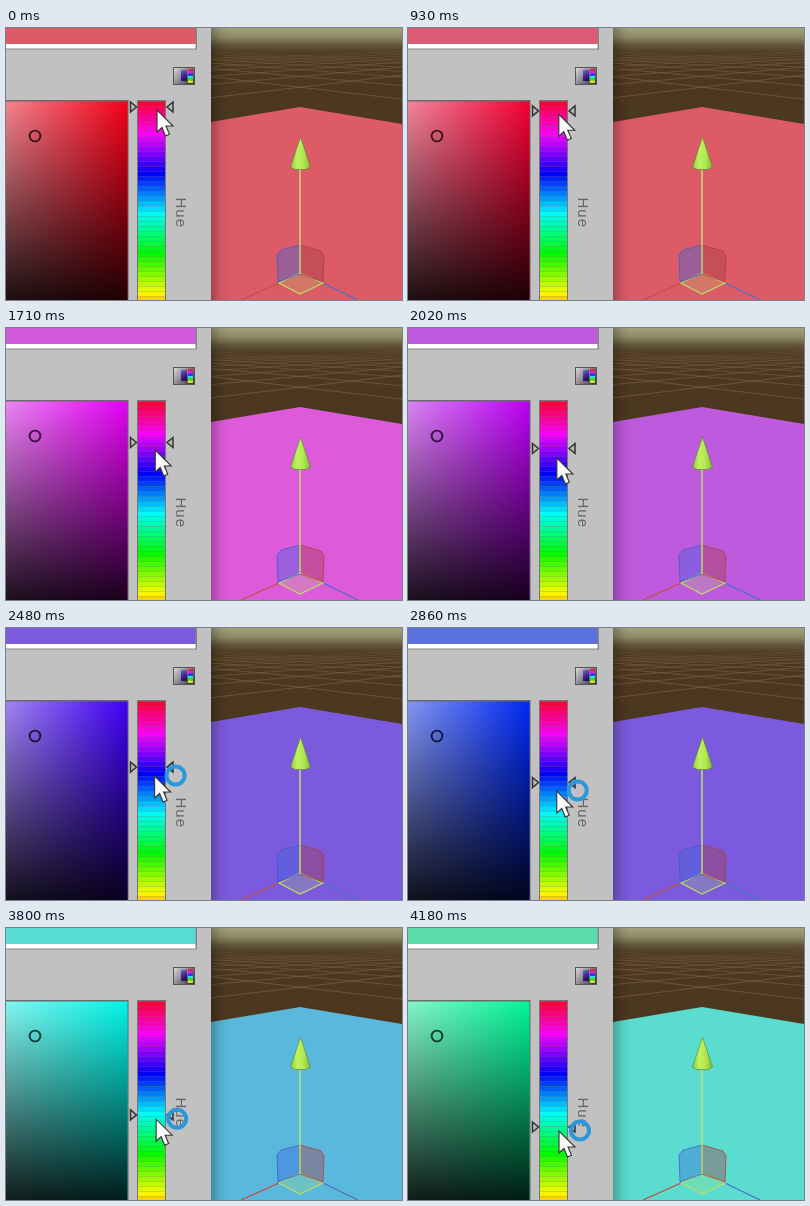
These frames come from a looping animation (396x272 px, 4.26 s). An HTML page with a canvas:

```html
<!DOCTYPE html>
<html lang="en">
<head>
<meta charset="utf-8">
<title>Hue slider</title>
<style>
html, body { margin: 0; width: 396px; height: 272px; overflow: hidden; background: #c1c1c1; }
canvas { display: block; }
</style>
</head>
<body>
<canvas id="stage" width="396" height="272"></canvas>
<script>
const W = 396, H = 272, LOOP = 4260, LAST = 43;
const ctx = document.getElementById('stage').getContext('2d');

// The drag advances in steps of about 77 ms, with a stall before step 10.
function stepAt(t) {
  if (t < 860) return 0;
  if (t < 1640) return Math.min(9, Math.floor((t - 855) / 76.3) + 1);
  return Math.min(LAST, 10 + Math.floor((t - 1626) / 77));
}

function along(keys, n) {
  const i = Math.max(1, keys.findIndex(([k]) => n <= k));
  const [a, va] = keys[i - 1], [b, vb] = keys[i];
  return va + (vb - va) * (n - a) / (b - a);
}

const cursorX = n => 151 - 2.4 * Math.sin(Math.PI * n / LAST);
const cursorY = n => along([[0, 82], [8, 116], [15, 130], [26, 163], [LAST, 203]], n);
const markerY = n => along([[0, 79], [8, 110], [15, 120.5], [31, 170], [LAST, 199]], n);

// The 3D view repaints only on every sixth step.
const paintedStep = n => n < 10 ? 0 : n - (n - 3) % 6;

const hueAt = y => 354 - 1.64 * (y - 79);
const barHue = y => 350 - 1.51 * (y - 73);

function hsv(h, s, v) {
  const f = n => {
    const k = (n + h / 60) % 6;
    return Math.round(255 * v * (1 - s * Math.max(0, Math.min(k, 4 - k, 1))));
  };
  return `rgb(${f(5)},${f(3)},${f(1)})`;
}

const materialColor = y => hsv(hueAt(y), 0.59, 0.865);

function box(x, y, w, h, fill) {
  ctx.fillStyle = fill;
  ctx.fillRect(x, y, w, h);
}

function gradient(x0, y0, x1, y1, ...colors) {
  const g = ctx.createLinearGradient(x0, y0, x1, y1);
  colors.forEach((c, i) => g.addColorStop(i / (colors.length - 1), c));
  return g;
}

function shape(points, fill, stroke, width = 1) {
  ctx.beginPath();
  points.forEach(([x, y]) => ctx.lineTo(x, y));
  ctx.closePath();
  if (fill) { ctx.fillStyle = fill; ctx.fill(); }
  if (stroke) { ctx.strokeStyle = stroke; ctx.lineWidth = width; ctx.stroke(); }
}

const line = (x0, y0, x1, y1, color, width = 1) =>
  shape([[x0, y0], [x1, y1]], null, color, width);

function ring(x, y, r, color, width) {
  ctx.beginPath();
  ctx.arc(x, y, r, 0, Math.PI * 2);
  ctx.strokeStyle = color;
  ctx.lineWidth = width;
  ctx.stroke();
}

function modeIcon() {
  box(167, 39, 22, 18, '#555');
  box(168, 40, 20, 16, gradient(168, 40, 188, 56, '#dcd6dc', '#85808a', '#302c38'));
  box(175, 42, 6, 11, gradient(175, 42, 181, 53, '#7070c8', '#45209b', '#17102d'));
  for (let i = 0; i < 6; i++) box(182, 41 + i * 2.3, 5, 2.4, hsv(350 - i * 58, 0.85, 0.9));
}

function colorField(hue) {
  box(0, 72, 122.5, H, '#6a6a6a');
  box(0, 73.5, 121.5, H, gradient(0, 0, 122, 0, hsv(hue, 0.46, 1), hsv(hue, 1, 1)));
  box(0, 73.5, 121.5, H, gradient(0, 73, 0, 298, 'rgba(0,0,0,.04)', '#000'));
  ring(29, 108, 5.4, hsv(hue, 0.7, 0.23), 1.9);
}

function hueBar(y) {
  box(131, 72, 29, H, '#777');
  for (let b = 73.5; b < H; b += 5) box(132, b, 27, 5, hsv(barHue(b + 2.5), 1, 0.98));
  for (const [x, dir] of [[124.5, 1], [167, -1]])
    shape([[x, y - 5], [x + dir * 6, y], [x, y + 5]], '#bbb', '#333', 1.5);
}

function hueLabel() {
  ctx.save();
  ctx.translate(169.5, 169.5);
  ctx.rotate(Math.PI / 2);
  ctx.font = '15px "Liberation Sans", Arial, sans-serif';
  ctx.letterSpacing = '1px';
  ctx.fillStyle = '#666';
  ctx.fillText('Hue', 0, 0);
  ctx.restore();
}

function picker(y) {
  box(0, 0, 205, H, '#c1c1c1');
  box(0, 0, 191, 21.5, '#858585');
  box(0, 0, 189.5, 16, materialColor(y));
  box(0, 16, 189.5, 4.5, '#fff');
  modeIcon();
  colorField(hueAt(y));
  hueBar(y);
  hueLabel();
}

function ground() {
  box(205, 0, 191, H, '#4c3820');
  box(205, 0, 191, 26, gradient(0, 0, 0, 26, '#a3a17c', '#8f8a65', '#60553a', '#4c3820'));
  // Two fans of lines meet at vanishing points on the horizon.
  for (let k = 1; k < 9; k++) {
    const drop = 67 / (1 + k * 0.42);
    const color = `rgba(130,108,76,${0.36 - k * 0.03})`;
    line(-107, 12, 695, 12 + 2 * drop, color);
    line(690, 12, -102, 12 + 2 * drop, color);
  }
}

function gizmo() {
  line(273, 255, 235, 272, '#c0504a');
  line(317, 255, 352, 272, '#4a74c0');
  shape([[294, 245], [317, 255], [294, 266], [273, 255]], 'rgba(175,225,110,.22)', '#b9df62', 1.2);
  shape([[271, 227], [275, 222], [294, 217], [294, 246], [272, 254]], 'rgba(60,100,225,.4)', 'rgba(60,90,200,.7)');
  shape([[294, 217], [315, 223], [318, 228], [317, 254], [294, 246]], 'rgba(165,60,70,.4)', 'rgba(175,60,60,.75)');
  line(294, 140, 294, 246, '#bfdf78');
  shape([[294.5, 109], [304.5, 139], [300, 141.5], [289, 141.5], [284.5, 139]],
    gradient(285, 0, 304, 0, '#95d044', '#bdf35e', '#b2e751', '#86bb3a'), 'rgba(75,120,45,.55)');
}

function scene(y) {
  ctx.save();
  ctx.beginPath();
  ctx.rect(205, 0, 191, H);
  ctx.clip();
  ground();
  shape([[294, 79], [396, 96], [396, H], [205, H], [205, 94]], materialColor(y));
  gizmo();
  box(205, 0, 18, H, gradient(205, 0, 223, 0, 'rgba(0,0,0,.25)', 'rgba(0,0,0,.07)', 'rgba(0,0,0,0)'));
  ctx.restore();
}

function pointer(x, y) {
  const outline = [[0, 0], [0, 22], [5, 17.5], [8.5, 26], [12.5, 24.3], [9, 16], [16, 16]];
  shape(outline.map(([a, b]) => [x + a, y + b]), '#fafafa', '#333', 1.1);
}

function draw(t) {
  const n = stepAt(t), x = cursorX(n), y = cursorY(n);
  picker(markerY(n));
  scene(markerY(paintedStep(n)));
  if (n === 8 || n === 9) {
    ring(x - 1, y, 11.5, '#2a9cf0', 4.5);
  } else {
    pointer(x, y);
    if (n >= 20) ring(x + 21, y - 0.5, 9, '#2a98dc', 4);
  }
}

const start = performance.now();
function tick(now) {
  draw(Math.max(0, now - start) % LOOP);
  requestAnimationFrame(tick);
}
draw(0);
requestAnimationFrame(tick);
</script>
</body>
</html>
```
